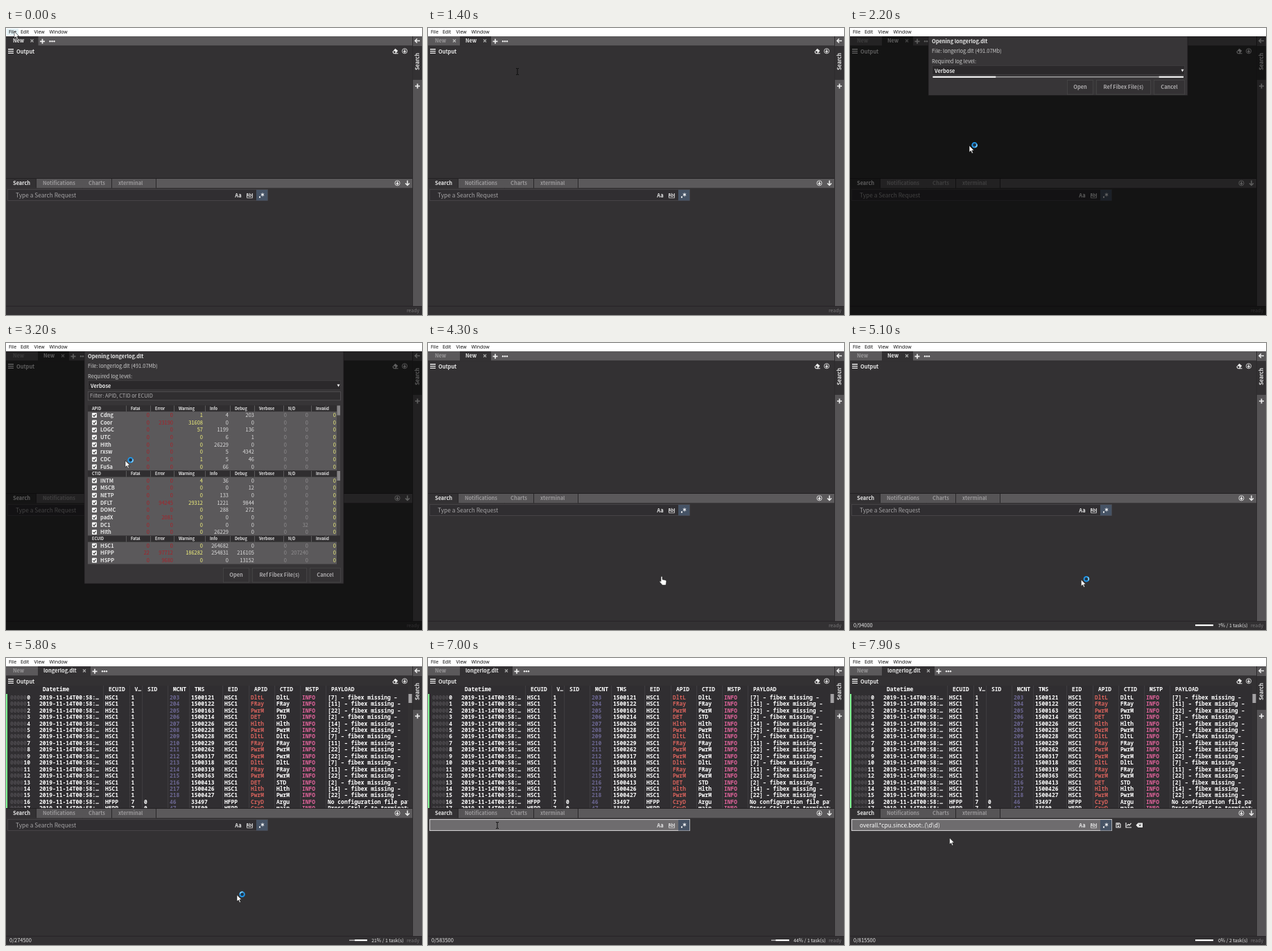
These frames come from a looping animation (600 by 415 pixels, 8000 ms). An HTML page:

```html
<!DOCTYPE html>
<html lang="en">
<head>
<meta charset="utf-8">
<title>Log viewer</title>
<style>
html, body { margin: 0; height: 100%; overflow: hidden; background: #333133; }
svg { display: block; width: 100%; height: 100%; }
text { font: 500 7.45px "Noto Sans CJK JP", "Noto Sans CJK SC", "Noto Sans", sans-serif; fill: #e8e8e8; white-space: pre; }
.menu { font: 6.9px "Noto Sans", "Open Sans", sans-serif; fill: #111; }
.b { font-weight: 700; }
.off { fill: #9a989a; }
.mid { text-anchor: middle; }
.end { text-anchor: end; }
.field { font-size: 8.33px; font-weight: 400; }
.small { font-size: 6.9px; }
.head { font-size: 5.6px; font-weight: 700; }
.mono { font: 600 7.98px "Noto Sans Mono", "DejaVu Sans Mono", monospace; fill: #fff; }
.line { fill: none; stroke: #eee; stroke-width: 1.5; }
</style>
</head>
<body>
<svg viewBox="0 0 600 415"></svg>
<script>
const rect = (x, y, w, h, fill, extra = '') =>
  `<rect x="${x}" y="${y}" width="${w}" height="${h}" fill="${fill}" ${extra}/>`;
const text = (x, y, s, cls = '', fill = '') =>
  `<text x="${x}" y="${y}" class="${cls}" ${fill && `style="fill:${fill}"`}>${s}</text>`;
const line = (d, color = '#eee', width = 1.5) =>
  `<path class="line" d="${d}" style="stroke:${color};stroke-width:${width}"/>`;
const group = (id, ...parts) => `<g id="${id}">${parts.join('')}</g>`;

const BG = '#333133', BAR = '#5b595b', EDGE = '#232123';

const cross = (x, color) => line(`M${x - 2} 16.5l4 4m0-4l-4 4`, color, 1.2);
const plus = (x, y) => line(`M${x - 3.5} ${y}h7m-3.5-3.5v7`, '#eee', 1.7);
const dots = x => [-3, 0, 3].map(d => `<circle cx="${x + d}" cy="19.2" r="1.2" fill="#eee"/>`).join('');
const downCircle = (x, y) => `<circle cx="${x}" cy="${y}" r="3.6" fill="none" stroke="#e4e4e4" stroke-width=".9"/>` +
  line(`M${x} ${y - 2.2}v4m-1.8-1.8l1.8 1.8l1.8-1.8`, '#eee', 1.2);

function tabs(id, names, activeEnd, oldCross) {
  const active = names.length - 1, start = active * 46;
  return group(id,
    active ? text(10, 21.4, names[0], 'b off') + (oldCross ? cross(38, '#bbb') : '') : '',
    rect(start, 12, activeEnd - start, 14, BG),
    text(active ? 54 : 10, 21.4, names[active], 'b'),
    cross(activeEnd - 9, '#aaa'), plus(activeEnd + 6, 19.3), dots(activeEnd + 20));
}

function logRows() {
  const heads = { Datetime: 53, ECUID: 148, 'V…': 185.5, SID: 204, MCNT: 241, TMS: 272,
    EID: 320, APID: 358, CTID: 395, MSTP: 432, PAYLOAD: 469 };
  const xs = Object.values(heads);
  const colors = { 4: '#6b6690', 7: '#d2615b', 9: '#e2649c' };
  const tails = [121, 122, 163, 214, 226, 228, 228, 229, 262, 317, 318, 319, 363, 413, 426, 427];
  const apps = 'DltL FRay PwrM DET Hlth PwrM DltL FRay PwrM PwrM'.split(' ');
  const size = { DltL: 7, FRay: 11, PwrM: 22, DET: 2, Hlth: 14 };
  const date = '2019-11-14T00:58:…';
  const rows = tails.map((tail, i) => {
    const app = apps[i % 10];
    return [date, 'HSC1', 1, '', 203 + i, 1500000 + tail, 'HSC1', app,
      app == 'DET' ? 'STD' : app, 'INFO', `[${size[app]}] – fibex missing –`];
  });
  rows.push([date, 'HFPP', 7, 0, 46, 33497, 'HFPP', 'CryD', 'Argu', 'INFO', 'No configuration file path'],
    [date, 'HFPP', 7, 0, 47, 33500, 'HFPP', 'CryD', 'main', 'INFO', 'Press Ctrl-C to terminate']);
  return group('log',
    rect(0, 40, 586, 178, '#302e31'), rect(0, 52, 2, 166, '#7df58f'),
    Object.entries(heads).map(([name, x]) => text(x, 47.8, name, 'mono')).join(''),
    xs.slice(1).map(x => rect(x - 7.5, 40, .6, 178, '#4b494c')).join(''),
    rows.map((row, i) => {
      const y = 59.8 + i * 9.44, n = String(i);
      return text(6, y, '0'.repeat(6 - n.length), 'mono', '#504d51') + text(35, y, n, 'mono end') +
        row.map((v, c) => text(xs[c] - 5, y, v, 'mono', colors[c])).join('');
    }).join(''),
    rect(580, 40, 6, 178, BG), rect(580.5, 52, 5, 13, '#a3a1a3'));
}

// Row format: name, error, warning, info, debug, not defined
const levelTables = [
  ['APID', 94.5, `Cdng 0 1 4 203 0|Coor 23190 31608 0 0 0|LOGC 0 57 1199 136 0|UTC 0 0 6 1 0
|Hlth 0 0 26229 0 0|rxsw 0 0 5 4342 0|CDC 0 1 5 46 0|FuSa 0 0 66 0 0`],
  ['CTID', 189, `INTM 0 4 36 0 0|MSCB 0 0 0 12 0|NETP 0 0 133 0 0|DFLT 94245 29312 1221 9844 0
|DOMC 0 0 288 272 0|padX 2081 0 0 0 0|DC1 0 0 0 0 32|Hlth 0 0 26229 0 0`],
  ['ECUID', 283, `HSC1 0 0 264682 0 0|HFPP 97712 186282 254831 216105 207240|HSPP 9680 0 0 13152 0`]
];

function levelTable([title, top, data]) {
  const rows = data.split('|').map(r => r.trim().split(' '));
  const heads = { [title]: 124, Fatal: 180, Error: 215, Warning: 249, Info: 294, Debug: 330,
    Verbose: 365, 'N/D': 407, Invalid: 447 };
  const ends = [207, 241, 284, 321, 358, 405, 436, 476];
  const colors = ['#a82028', '#a82028', '#f4f47c', '#ddd', '#ddd', '#908e90', '#908e90', '#eef07c'];
  const bodyTop = top + 4.7, height = rows.length * 10.64;
  return rect(118, top - 4.5, 364, 9.2, '#302e30') + rect(118, bodyTop, 359, height, BAR) +
    Object.entries(heads).map(([h, x], i) => text(x, top + 2, h, 'head') +
      (i ? rect(x - 7, top - 4, .6, 8.5, '#777') : '')).join('') +
    rows.map(([name, error, warn, info, debug, nd], i) => {
      const y = top + 10 + i * 10.64;
      const values = [name == 'HFPP' ? 22 : 0, error, warn, info, debug, 0, nd, 0];
      return rect(124, y - 3.6, 7, 7, '#f4f4f4', 'rx="1"') + line(`M125.5 ${y}l1.6 1.7l2.6-3.4`, '#333', 1.1) +
        text(136, y + 2.7, name, 'b') +
        values.map((v, c) => text(ends[c], y + 2.7, v, 'end', colors[c])).join('');
    }).join('') +
    (rows.length > 3 ? rect(477, top - 4, 5, height + 9, '#434143') + rect(477.5, top - 4, 4.5, 14, '#858385') : '');
}

const button = (x, w, label) => rect(x, 75.5, w, 20.5, '#343234', 'stroke="#484648" stroke-width=".8"') +
  text(x + w / 2, 88.2, label, 'b mid', '#aaa8aa');

const dialog = group('dialog',
  rect(0, 12, 600, 403, '#000', 'opacity=".6"'),
  `<rect id="panel" x="113" y="12" width="374" fill="#373537" stroke="#1b191b" stroke-width=".7"/>`,
  text(118, 21.9, 'Opening longerlog.dlt', 'b'),
  text(118, 36, 'File: longerlog.dlt (491.07Mb)', '', '#ccc'),
  text(118, 51, 'Required log level:', '', '#ccc'),
  rect(118.5, 54.5, 364, 13, '#2b292b', 'stroke="#454345" stroke-width=".6"'),
  text(122, 64.6, 'Verbose', 'b'), '<path d="M477.5 59.8h4l-2 3.6z" fill="#eee"/>',
  group('loading', rect(119.5, 70.2, 361.5, 1.2, '#b8b8b8'),
    '<path id="slider" stroke="#fff" stroke-width="2"/>'),
  group('levels', rect(118.5, 70.3, 364, 12.5, '#302e30', 'stroke="#5a585a" stroke-width=".7"'),
    text(121, 79.3, 'Filter: APID, CTID or ECUID', '', '#b4b2b4'), levelTables.map(levelTable).join('')),
  group('buttons', button(313.5, 37, 'Open'), button(355.5, 78, 'Ref Fibex File(s)'), button(438.5, 44, 'Cancel')));

const lowerTabs = [['Search', 0, 43, 10], ['Notifications', 44, 66, 53], ['Charts', 110, 42, 119], ['xterminal', 153, 63, 162]];

const chrome =
  rect(0, 217, 586, 1, EDGE) + rect(0, 218, 586, 13.5, BAR) +
  lowerTabs.map(([name, x, w, tx], i) => rect(x, 218, w, 13.5, i ? '#565456' : BG) +
    rect(x + w, 218, .9, 13.5, EDGE) + text(tx, 226.8, name, i ? 'b off' : 'b')).join('') +
  downCircle(564.5, 224.3) + line('M579 220.5v7m-3-3l3 3l3-3') +
  rect(0, 231.5, 586, 170.5, BG) +
  '<rect id="field" x="2.5" y="233.5" width="375" height="16"/>' +
  rect(361, 234, 16.3, 15.5, '#465365') +
  text(335, 244.8, 'Aa', 'b mid') + text(351.5, 244.4, 'Abl', 'head mid') +
  line('M347.5 239v6.7h8v-6.7', '#ddd', .8) +
  rect(365, 243.5, 2, 2, '#fff') + line('M370 238.5v5m-2.2-3.8l4.4 2.6m0-2.6l-4.4 2.6', '#fff', 1) +
  rect(0, 402, 600, 13, BG) + rect(0, 401.8, 600, .8, EDGE) + text(578, 411, 'ready', 'small', '#777577') +
  rect(586, 12, 14, 390, '#565456') + rect(586, 12, .8, 390, EDGE) + rect(587, 26, 13, 49, BG) +
  line('M597 18.5h-7m3-3l-3 3l3 3') + plus(593.5, 84) +
  `<g transform="translate(596.3 48.5) rotate(-90)">${text(0, 0, 'Search', 'b mid')}</g>`;

const searchIcons = group('tools',
  line('M384 238.8h4.6l1.4 1.4v4.8h-6z', '#eee', 1.1) + rect(385, 239.6, 3.2, 1.6, '#eee') + rect(386, 242.4, 2, 1.8, '#eee'),
  line('M398 238v7h8m-6.5-2.5l2-2l1.5 1.3l2.5-3', '#eee', 1.2),
  '<path d="M412.5 241.8l3-3.3h6.5v6.6h-6.5z" fill="#eee"/>', line('M416.8 240.3l3 3m0-3l-3 3', BG, 1));

const pointer = group('pointer',
  group('arrow', '<path d="M0 0v9.6l2.3-2l1.6 3.6l1.6-.7l-1.6-3.5h3z" fill="#fff" stroke="#111" stroke-width=".6"/>'),
  group('ring', '<circle cx="7.6" cy="-.8" r="3.3" fill="#234" stroke="#2196e8" stroke-width="1.9"/>',
    '<path id="spin" d="M7.6-4.1a3.3 3.3 0 0 1 3.3 3.3" fill="none" stroke="#7fd0ff" stroke-width="1.6"/>'),
  group('beam', line('M-2-4.5h1.3l.7.7l.7-.7h1.3M0-4v8M-2 4.5h1.3l.7-.7l.7.7h1.3', '#0c0c0c', 1)),
  group('hand', '<path d="M0 0q1.2-1 2 0v4l4.5 1q1.5.4 1.3 2l-.8 5h-5l-4-4.8q0-1.3 1.2-1l.8.8z" fill="#fff" stroke="#222" stroke-width=".5"/>'));

document.querySelector('svg').innerHTML =
  rect(0, 0, 600, 415, BG) + rect(0, 12, 600, 14, BAR) + rect(0, 25.5, 586, .6, EDGE) +
  tabs('tabs0', ['New'], 46.5) + tabs('tabs1', ['New', 'New'], 91, true) +
  tabs('tabs2', ['New', 'New'], 91) + tabs('tabs3', ['New', 'longerlog.dlt'], 122) +
  line('M3 30.8h8m-8 2.8h8m-8 2.8h8', '#eee', 1.4) + text(15, 36.5, 'Output', 'b') +
  line('M558 34.5l3.5-4l3 2.5l-3.2 3.7h-2z', '#eee', 1.1) + '<path d="M559.5 32.8l2-2.3l3 2.5l-2 2.3z" fill="#eee"/>' +
  line('M561 36.8h4.5', '#eee', 1.1) + downCircle(575, 33.3) +
  logRows() + chrome +
  '<text id="query" x="14" y="244.7" class="field"></text>' + searchIcons +
  group('status', '<text id="count" x="5" y="411"></text>',
    '<rect id="track" y="407.4" width="26" height="1.6" fill="#aaa8aa"/>',
    '<rect id="bar" y="407" height="2.2" fill="#fff"/>',
    '<text id="tasks" x="573.5" y="411" class="small end"></text>') +
  dialog +
  rect(0, 0, 600, 12, '#fff') + '<rect id="hover" x="1" y="1" width="17" height="10" fill="#e5f3f7"/>' +
  text(4, 8.4, 'File', 'menu') + text(21, 8.4, 'Edit', 'menu') + text(40.5, 8.4, 'View', 'menu') +
  text(62.5, 8.4, 'Window', 'menu') + pointer;

const el = {};
document.querySelectorAll('[id]').forEach(e => el[e.id] = e);
const show = (id, on) => el[id].style.display = on ? '' : 'none';
const set = (id, attrs) => Object.entries(attrs).forEach(([k, v]) => el[id].setAttribute(k, v));

// Pointer stops: time, x, y
const stops = [[0, 12, 5], [500, 30, 60], [700, 30, 60], [1000, 129, 63], [1500, 129, 63], [2100, 172, 170],
  [3300, 172, 170], [4200, 336, 338], [4700, 336, 338], [5200, 333, 342.5], [6000, 333, 342.5],
  [6700, 100, 242], [7300, 100, 242], [7800, 143.5, 260], [8000, 143.5, 260]];

function pointerAt(t) {
  const i = stops.findIndex(s => s[0] > t), [t0, x0, y0] = stops[i - 1], [t1, x1, y1] = stops[i];
  const p = (t - t0) / (t1 - t0), e = p * p * (3 - 2 * p);
  return [x0 + (x1 - x0) * e, y0 + (y1 - y0) * e];
}

function render(t) {
  const between = (a, b) => t >= a && t < b;
  const tab = t < 1000 ? 0 : t < 1500 ? 1 : t < 5200 ? 2 : 3;
  for (let i = 0; i < 4; i++) show('tabs' + i, i == tab);
  show('hover', t < 700);
  show('log', t >= 5200);

  const levels = t >= 2600;
  show('dialog', between(1500, 4300));
  show('levels', levels);
  show('loading', !levels);
  set('panel', { height: levels ? 336 : 85.5 });
  set('buttons', { transform: `translate(0 ${levels ? 250 : 0})` });
  const head = ((t - 1500) / 1000 * 361 + 199) % 361;
  const tail = Math.max(0, head - 126);
  set('slider', { d: `M${119.5 + tail} 70.8H${119.5 + head}` + (head < 126 ? `M${355 + head} 70.8H481` : '') });

  const focused = t >= 6900, filled = t >= 7200, searching = t >= 7600;
  set('field', { fill: focused ? '#6e6c6e' : '#302e31', stroke: focused ? '#d0ced0' : '#4b494b',
    'stroke-width': focused ? 1.1 : .8 });
  el.query.textContent = filled ? 'overall.*cpu.since.boot:.(\\d\\d)' : focused ? '' : 'Type a Search Request';
  el.query.style.fill = filled ? '#fff' : '#a5a3a5';
  el.query.style.fontWeight = filled ? 500 : 400;
  show('tools', filled);

  const count = Math.round((274500 + (t - 5800) * 257.62) / 500) * 500;
  const percent = searching ? 0 : Math.floor(count / 13070);
  show('status', t >= 4800);
  el.count.textContent = '0/' + count;
  el.tasks.textContent = `${percent}% / ${searching ? 2 : 1} task(s)`;
  const barX = percent > 9 ? 495 : 498, gap = 4 + 4 * Math.cos((t - 5800) * Math.PI / 700);
  set('track', { x: barX });
  set('bar', { x: barX + gap, width: 26 - gap });

  const [x, y] = pointerAt(t);
  const beam = between(800, 1500) || between(6600, 7500), hand = between(4100, 4800);
  set('pointer', { transform: `translate(${x} ${y})` });
  show('beam', beam);
  show('hand', hand);
  show('arrow', !beam && !hand);
  show('ring', between(1500, 3400) || between(4800, 6100));
  set('spin', { transform: `rotate(${t * .36} 7.6 -.8)` });
}

const start = performance.now();
(function tick() {
  const t = (performance.now() - start) % 8000;
  render(Math.floor(t / 100) * 100);
  requestAnimationFrame(tick);
})();
</script>
</body>
</html>
```
